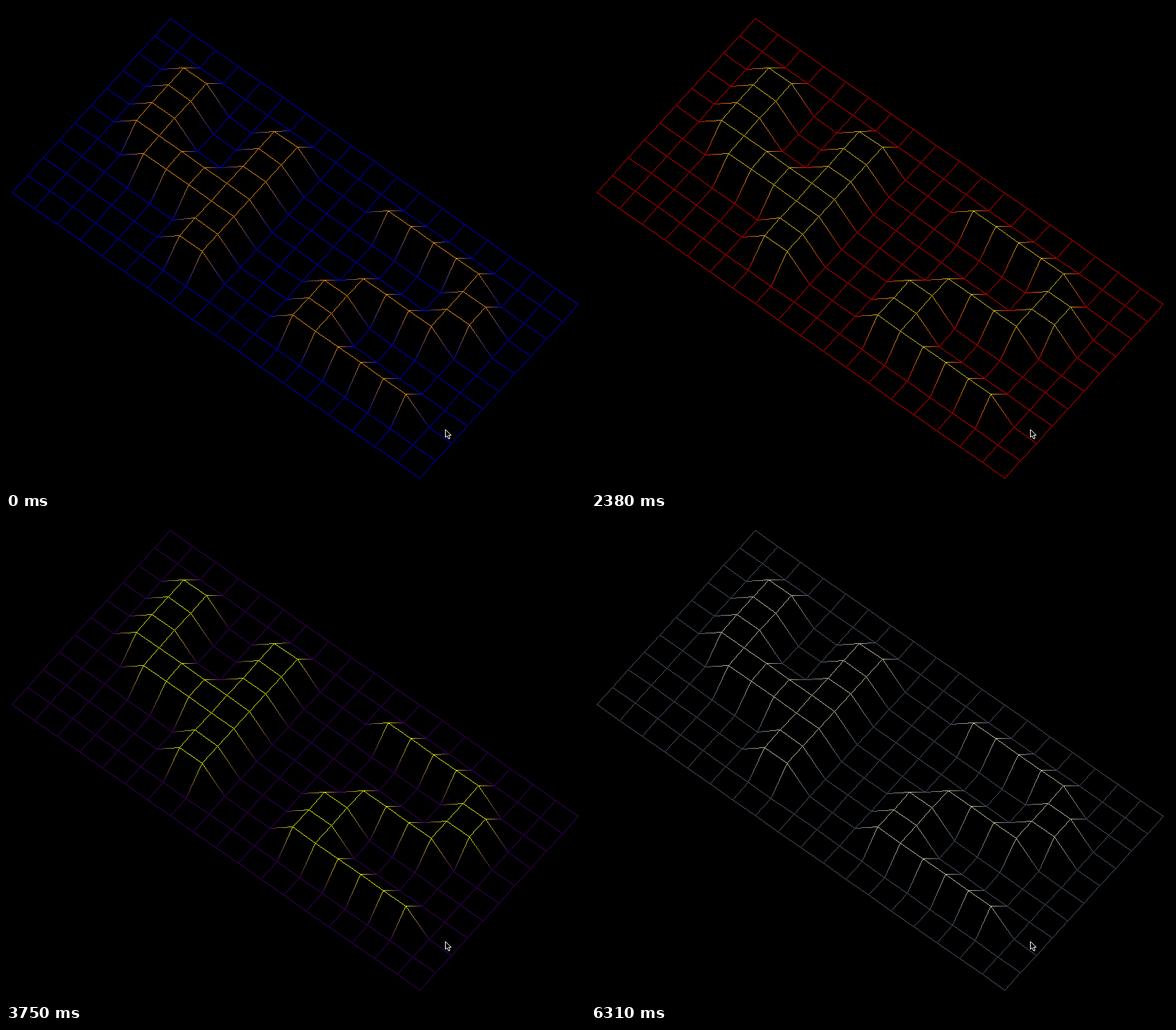
An HTML page with a canvas that plays this animation: 819x684 px, repeating every 6370 ms.

```html
<!DOCTYPE html>
<html lang="en">
<head>
<meta charset="utf-8">
<title>Wireframe relief</title>
<style>
  html, body { margin: 0; width: 100%; height: 100%; overflow: hidden; background: #000; }
  canvas, svg { position: absolute; left: 0; top: 0; display: block; }
</style>
</head>
<body>
<canvas id="stage" width="819" height="684"></canvas>
<svg width="819" height="684" viewBox="0 0 819 684">
  <path d="M621.5 598.5V609.5L624 607.3L626 611.8L628 611L626.2 606.5H629.8Z"
        fill="#000" stroke="#fff" stroke-width="1"/>
</svg>
<script>
const W = 819, H = 684, LOOP = 6370, STEP = 62.5;

// Height map: # is a raised point
const MAP = [
  '...................',
  '...................',
  '..##..##...#####...',
  '..##..##.......##..',
  '..##..##.......##..',
  '..######....####...',
  '...#####...##......',
  '......##...##......',
  '......##...######..',
  '...................',
  '...................'
];

// Palettes as [ground, peak]
const BLUE   = [[0, 0, 208], [224, 138, 10]];
const MONO   = [[0, 0, 0], [232, 232, 232]];
const FIRE   = [[204, 0, 0], [204, 180, 24]];
const RED    = [[224, 0, 0], [16, 0, 216]];
const VIOLET = [[60, 0, 100], [216, 224, 0]];
const TEAL   = [[0, 160, 140], [216, 64, 128]];
const SLATE  = [[70, 82, 98], [180, 180, 156]];

// Step at which each palette is reached
const KEYS = [
  [0, BLUE], [3, BLUE], [9, MONO], [18, MONO], [38, FIRE], [49, RED],
  [60, VIOLET], [72, TEAL], [85, TEAL], [94, SLATE], [102, SLATE]
];

const ctx = document.getElementById('stage').getContext('2d');
const image = ctx.createImageData(W, H);
const data = image.data;
for (let i = 3; i < data.length; i += 4) data[i] = 255;

const lerp = (a, b, u) => a + (b - a) * u;
const mix = (a, b, u) => a.map((v, i) => lerp(v, b[i], u));

function project(c, r) {
  const z = MAP[r][c] === '#' ? 1 : 0;
  return {
    x: Math.round(232 + 32.06 * c - 22.44 * r),
    y: Math.round(17.3 + 22.43 * c + 24.58 * r - 24.5 * z),
    z
  };
}

// Every lit pixel with its height between ground and peak
const pixels = [];
function addLine(a, b) {
  const n = Math.max(Math.abs(b.x - a.x), Math.abs(b.y - a.y));
  for (let i = 0; i <= n; i++) {
    const u = i / n;
    const x = Math.round(lerp(a.x, b.x, u)), y = Math.round(lerp(a.y, b.y, u));
    pixels.push({ at: (y * W + x) * 4, z: lerp(a.z, b.z, u) });
  }
}

MAP.forEach((row, r) => {
  for (let c = 0; c < row.length; c++) {
    const p = project(c, r);
    if (c + 1 < row.length) addLine(p, project(c + 1, r));
    if (r + 1 < MAP.length) addLine(p, project(c, r + 1));
  }
});

function paletteAt(step) {
  let i = 0;
  while (i < KEYS.length - 2 && step >= KEYS[i + 1][0]) i++;
  const [s0, p0] = KEYS[i], [s1, p1] = KEYS[i + 1];
  const u = (step - s0) / (s1 - s0);
  return [mix(p0[0], p1[0], u), mix(p0[1], p1[1], u)];
}

function draw(step) {
  const [ground, peak] = paletteAt(step);
  for (const { at, z } of pixels) {
    for (let k = 0; k < 3; k++) data[at + k] = lerp(ground[k], peak[k], z);
  }
  ctx.putImageData(image, 0, 0);
}

let shown = -1;
const start = performance.now();
function tick() {
  const t = (performance.now() - start) % LOOP;
  const step = Math.min(101, Math.floor((t + 5) / STEP));
  if (step !== shown) draw(shown = step);
  requestAnimationFrame(tick);
}
tick();
</script>
</body>
</html>
```
